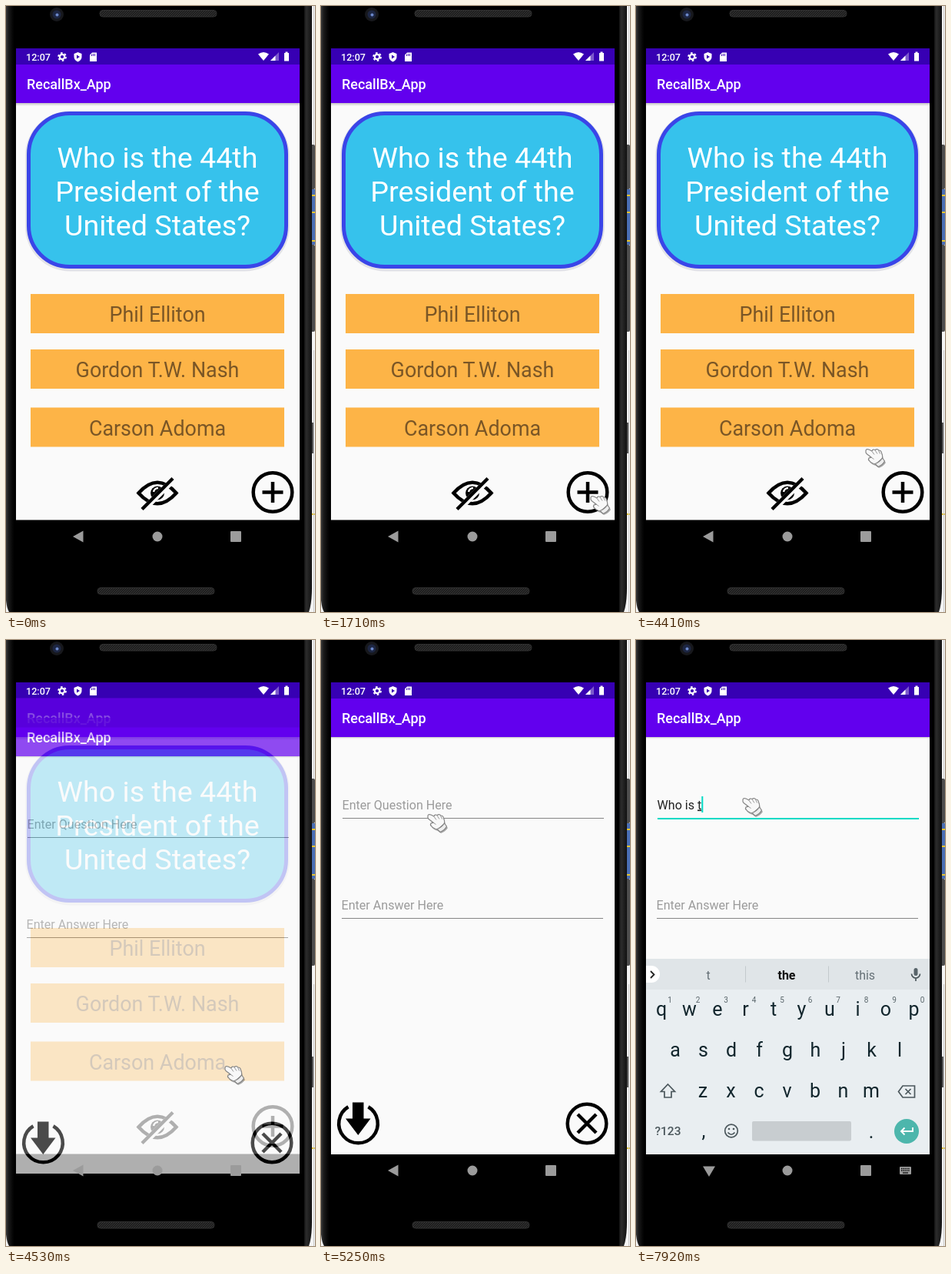
An HTML page that plays this animation: 402x787 px, repeating every 8000 ms.

```html
<!DOCTYPE html>
<html lang="en">
<head>
<meta charset="utf-8">
<title>Quiz card app</title>
<style>
  html, body { margin: 0; width: 100%; height: 100%; overflow: hidden; background: #f4f4f4; }
  svg { display: block; width: 100vw; height: 100vh; }
  text { font-family: Roboto, Inter, sans-serif; }
  .mid { text-anchor: middle; }
  .title { font-size: 18px; font-weight: 500; fill: #fff; }
  .ask { font-size: 37.7px; fill: #fff; }
  .option { font-size: 26.9px; fill: #7a5626; }
  .hint { font-size: 16.1px; fill: #9b9b9b; }
  .typed { font-size: 16.1px; fill: #212121; white-space: pre; }
  .typed .live { text-decoration: underline; }
  .key { font-size: 25px; fill: #12262d; }
  .digit { font-size: 10px; fill: #59656a; }
  .word { font-size: 16px; fill: #657076; }
  .line { fill: none; stroke: #000; stroke-width: 4.5; }
  .thin { fill: none; stroke: #4b575c; stroke-width: 1.7; }
</style>
</head>
<body>
<svg viewBox="0 0 402 787" preserveAspectRatio="none">
  <defs>
    <linearGradient id="side">
      <stop offset="0" stop-color="#3a3a3a"/><stop offset=".008" stop-color="#1c1c1c"/>
      <stop offset=".022" stop-color="#050505"/><stop offset=".97" stop-color="#050505"/>
      <stop offset=".982" stop-color="#2c2c2c"/><stop offset="1" stop-color="#111"/>
    </linearGradient>
    <linearGradient id="shade" x2="0" y2="1">
      <stop offset="0" stop-color="#000" stop-opacity=".22"/><stop offset="1" stop-color="#000" stop-opacity="0"/>
    </linearGradient>
    <pattern id="mesh" width="3" height="3" patternUnits="userSpaceOnUse">
      <rect width="3" height="3" fill="#1d1d1d"/><path d="M0 3L3 0" stroke="#3c3c3c" stroke-width=".8"/>
    </pattern>
    <clipPath id="screen"><rect x="13" y="55" width="369" height="613"/></clipPath>
  </defs>

  <!-- phone body -->
  <rect width="402" height="787" fill="#f4f4f4"/>
  <rect x="397" y="238" width="5" height="72" fill="#4a6fb5"/>
  <path d="M398 246h4M398 268h4M398 305h4M398 660h4" stroke="#e6c52f" stroke-width="2"/>
  <rect x="396" y="180" width="6" height="58" rx="2" fill="#4d4d4d"/>
  <rect x="396" y="310" width="6" height="113" rx="2" fill="#4d4d4d"/>
  <path d="M400.5 0V180M400.5 447V787" stroke="#c9c9c9"/>
  <path d="M399 541v40" stroke="#555" stroke-width="2"/>
  <path d="M0 0H398V755Q398 776 394 787H4Q1 782 0 772Z" fill="url(#side)"/>
  <rect x="10" width="378" height="787" fill="#000"/>
  <circle cx="66" cy="11" r="9" fill="#17181c"/>
  <circle cx="66" cy="11" r="5.5" fill="#1d2642"/>
  <circle cx="66.5" cy="11.5" r="2" fill="#6a86c8"/>
  <g fill="url(#mesh)" stroke="#303030">
    <rect x="122" y="5.500" width="152" height="8.500" rx="4"/>
    <rect x="119" y="755.500" width="152" height="8.500" rx="4"/>
  </g>

  <!-- quiz page -->
  <g id="quiz">
    <rect x="13" y="55" width="369" height="612.500" fill="#fafafa"/>
    <rect x="13" y="55" width="369" height="21" fill="#3700b3"/>
    <rect x="13" y="76" width="369" height="50" fill="#6200ee"/>
    <rect x="13" y="126" width="369" height="4" fill="url(#shade)"/>
    <text class="title" x="27" y="108">RecallBx_App</text>
    <rect x="25" y="136.500" width="344" height="208" rx="58" fill="#e3e3e6"/>
    <rect x="29.500" y="139.500" width="335" height="199" rx="53" fill="#36c2ec" stroke="#3a45e8" stroke-width="5"/>
    <g class="ask mid">
      <text x="197" y="210">Who is the 44th</text>
      <text x="197" y="254">President of the</text>
      <text x="197" y="298">United States?</text>
    </g>
    <g fill="#fdb447">
      <rect x="32" y="374" width="330" height="51"/>
      <rect x="32" y="446" width="330" height="51"/>
      <rect x="32" y="521.500" width="330" height="51"/>
    </g>
    <g class="option mid">
      <text x="197" y="409.500">Phil Elliton</text>
      <text x="197" y="482">Gordon T.W. Nash</text>
      <text x="197" y="557.500">Carson Adoma</text>
    </g>
    <path class="line" d="M172.500 632.500Q197 605 221.500 632.500Q197 660 172.500 632.500Z"/>
    <circle cx="197" cy="632.500" r="9"/>
    <path d="M192 631a6 6 0 0 1 6-5" fill="none" stroke="#fafafa" stroke-width="2.500"/>
    <path d="M178 655L219 614" stroke="#fafafa" stroke-width="8"/>
    <path class="line" d="M177 653.500L217 613.500"/>
    <circle class="line" cx="347" cy="631.500" r="25.300"/>
    <path class="line" d="M333.500 631.500h27M347 618v27"/>
  </g>

  <!-- form page -->
  <g id="form">
    <rect x="13" y="76" width="369" height="592" fill="#fafafa"/>
    <rect x="13" y="76" width="369" height="50" fill="#6200ee"/>
    <rect x="13" y="126" width="369" height="2" fill="url(#shade)"/>
    <text class="title" x="27" y="108">RecallBx_App</text>
    <text class="hint" id="ask" x="27.500" y="219.500">Enter Question Here</text>
    <text class="hint" x="26.500" y="349.500">Enter Answer Here</text>
    <rect id="rule" x="28" width="340"/>
    <rect x="27" y="361" width="340" height="1" fill="#858585"/>
    <text class="typed" x="27.500" y="219.500"><tspan id="done"></tspan><tspan id="live" class="live"></tspan></text>
    <rect id="caret" y="203" width="2" height="21" fill="#03dac5"/>
    <path class="line" d="M35.500 606.300A25.300 25.300 0 1 0 61.500 606.300"/>
    <path d="M41 600.500h14.500v21h9L48.300 643L32 621.500h9z"/>
    <circle class="line" cx="346" cy="628" r="25.300"/>
    <path class="line" d="M334 616l24 24M358 616l-24 24"/>
  </g>
  <rect id="strip" x="13" width="369"/>

  <!-- status bar -->
  <g fill="#fff">
    <text x="26" y="70.500" font-size="12.600" font-weight="500">12:07</text>
    <circle cx="73" cy="66" r="3.200" fill="none" stroke="#fff" stroke-width="2.200"/>
    <circle cx="73" cy="66" r="5" fill="none" stroke="#fff" stroke-width="1.800" stroke-dasharray="2.600 2.636"/>
    <path d="M93.500 60l5 2v4q0 4-5 6.500q-5-2.500-5-6.500v-4z"/>
    <path d="M92 63.500l4 2.500l-4 2.500z" fill="#3700b3"/>
    <path d="M112 60.500h6v11.500h-9v-8.500z"/>
    <path d="M111.500 62.500v2.500M113.500 62v3M115.500 62v3" stroke="#3700b3" stroke-width=".9"/>
    <path d="M328 62.500q7-5 14 0l-7 8.500z"/>
    <path d="M344 71L355 60v11z" opacity=".35"/><path d="M344 71l6.500-6.500v6.500z"/>
    <path d="M362 61h1.500v-1.500h3v1.500h1.500v10.500h-6z"/>
  </g>

  <!-- keyboard -->
  <g clip-path="url(#screen)"><g id="board">
    <rect x="13" y="414" width="369" height="254" fill="#e9eef1"/>
    <rect x="13" y="414" width="369" height="40" fill="#e0e5e8"/>
    <path d="M13 423h7a11 11 0 0 1 0 22h-7z" fill="#fff"/>
    <path d="M19 430l4.500 4.500l-4.500 4.500" fill="none" stroke="#222" stroke-width="1.800"/>
    <path d="M142.500 423.500v21M250.500 423.500v21" stroke="#c3c9cc"/>
    <g class="word mid" id="words"><text x="94" y="440.500"></text><text x="196" y="440.500"></text><text x="298" y="440.500"></text></g>
    <rect x="361.500" y="426" width="5" height="10" rx="2.500" fill="#58646a"/>
    <path class="thin" d="M358.500 433.500a5.500 5.500 0 0 0 11 0M364 439v4"/>
    <g class="mid" id="keys"></g>
    <path class="thin" d="M41.500 577l9 9.500h-4.500v7.500h-9v-7.500h-4.500z"/>
    <path class="thin" d="M347 579h15.500v15h-15.500l-5.500-7.500zM350.500 583l7 7M357.500 583l-7 7"/>
    <text class="mid" x="41.500" y="643" font-size="15.500" font-weight="500" fill="#4b575c">?123</text>
    <circle class="thin" cx="124" cy="637.500" r="8.300"/>
    <path class="thin" d="M119.500 639.500q4.500 5.500 9 0"/>
    <circle cx="121" cy="635" r="1.300" fill="#4b575c"/><circle cx="127" cy="635" r="1.300" fill="#4b575c"/>
    <rect x="151" y="625" width="129" height="25.500" rx="2" fill="#c8cdd0"/>
    <circle cx="352" cy="638" r="16" fill="#4db6ac"/>
    <path d="M360 633v5h-15M349.500 633.500l-4.500 4.500l4.500 4.500" fill="none" stroke="#fff" stroke-width="1.900"/>
  </g></g>

  <!-- navigation -->
  <g fill="#9b9b9b">
    <path id="back" d="M87 689l13.500-7.500v15z"/>
    <path id="down" d="M87 683.500h16l-8 13.500z"/>
    <circle cx="197" cy="689" r="6.500"/>
    <rect x="292" y="682" width="14" height="14" rx="1"/>
    <g id="switch">
      <rect x="343" y="684" width="15" height="10" rx="1"/>
      <path d="M345 686.500h11M345 689h11" stroke="#000" stroke-width="1.300" stroke-dasharray="1.300 1"/>
      <path d="M347 692h7" stroke="#000" stroke-width="1.200"/>
    </g>
  </g>

  <!-- pointer -->
  <g id="hand" stroke-linejoin="round">
    <path d="M3 6Q3 3 6 4L10 6Q12 3 15 5Q21 4 23 9L24 15L27 19Q24 24 18 26L14 23Q9 22 6 18Q5 15 9 14L4 9Z" fill="#000" opacity=".32"/>
    <path d="M1 4Q1 .500 5 2L9 4Q10 1 13 2.500Q16 .500 18 3Q21 3 21.500 6.500Q23 9 22.500 13.500L14 21Q8 20 6 17Q3.500 15.500 5 13Q7 12 8.500 12.500L2 7.500Q.500 6 1 4Z" fill="#f8f8f8" stroke="#858585" stroke-width="1.200"/>
    <path d="M22.500 13L25.500 17Q23 22 17 24.500L13 20.500Q19 18.500 22.500 13Z" fill="#eee" stroke="#858585" stroke-width="1.200"/>
    <path d="M9 4.500l3 4M13 3l3 4.500M17.500 3l2 4.500M8.500 12.500l3 2" fill="none" stroke="#999"/>
  </g>
</svg>
<script>
  const LOOP = 8000;
  const $ = id => document.getElementById(id);
  // 'inherit' keeps children hidden while their page is hidden
  const show = (id, on) => $(id).setAttribute('visibility', on ? 'inherit' : 'hidden');
  const put = (id, attrs) => { for (const k in attrs) $(id).setAttribute(k, attrs[k]); };

  // time, x, y
  const path = [
    [780, 145, 762], [930, 150, 746], [1050, 163, 721], [1170, 184, 691], [1290, 208, 666],
    [1440, 264, 654], [1560, 322, 640], [1710, 350, 635], [1860, 345, 629], [1980, 326, 611],
    [2130, 297, 505], [2250, 312, 565], [2370, 342, 635], [2520, 359, 647], [2670, 356, 642],
    [2820, 346, 627], [4410, 298, 574], [4530, 284, 552], [4680, 265, 526], [4830, 222, 412],
    [4980, 165, 295], [5130, 141, 240], [5250, 138, 225], [5370, 138, 204]
  ];
  // time, page offset, opacity, top of the blended strip
  const slide = [[4530, 25, .7, 75], [4680, 4, 1, 65], [4830, 1, 1, 57], [4980, 0, 1, 55]];
  // time, keyboard offset
  const rise = [[5670, 130], [5790, 36], [5910, 0]];
  // time, finished text, word in progress, suggestions
  const typing = [
    [0, '', '', 'the I thanks'],
    [6590, '', 'W', 'W We What'],
    [6990, '', 'Wh', 'Wh What When'],
    [7260, '', 'Who', 'Who Whole Whose'],
    [7380, 'Who ', '', 'is are wants'],
    [7530, 'Who ', 'i', 'i is in'],
    [7650, 'Who ', 'is', 'is isn’t it’s'],
    [7770, 'Who is ', '', 'the a going'],
    [7920, 'Who is ', 't', 't the this']
  ];
  const at = (list, t) => list.filter(step => step[0] <= t).pop();

  function buildKeys() {
    const label = (cls, x, y, s) => `<text class="${cls}" x="${x}" y="${y}">${s}</text>`;
    const row = (chars, x, y) => [...chars].map((c, i) => label('key', x + i * 36.5, y, c)).join('');
    $('keys').innerHTML = row('qwertyuiop', 33, 488) + row('asdfghjkl', 51, 541) + row('zxcvbnm', 87, 594)
      + label('key', 88, 646, ',') + label('key', 306, 647, '.')
      + [...'1234567890'].map((c, i) => label('digit', 44 + i * 36.5, 470.5, c)).join('');
  }

  let last;
  function type(step) {
    if (step === last) return;
    last = step;
    const [time, done, live, words] = step;
    $('done').textContent = done;
    $('live').textContent = live;
    words.split(' ').forEach((w, i) => { $('words').children[i].textContent = w; });
    const strong = live === 't';
    $('words').children[1].setAttribute('style', strong ? 'font-weight:700;fill:#111' : '');
    show('ask', !time);
    put('caret', { x: 27.5 + (time ? $('done').parentNode.getComputedTextLength() : 0) });
  }

  function draw(t) {
    const spot = at(path, t);
    show('hand', spot);
    if (spot) put('hand', { transform: `translate(${spot[1]} ${spot[2]})` });

    const page = at(slide, t);
    show('form', page);
    show('strip', page);
    show('quiz', !page || page[1]);
    if (page) {
      const [, dy, alpha, top] = page;
      put('form', { transform: `translate(0 ${dy})`, opacity: alpha });
      put('strip', { y: top, height: 76 + dy * 1.5 - top, opacity: alpha, fill: dy ? '#5400d4' : '#3700b3' });
    }

    const focus = t >= 5370;
    put('rule', focus ? { y: 231, height: 2, fill: '#03dac5' } : { y: 231, height: 1, fill: '#858585' });
    const kb = t >= 5520;
    show('back', !kb);
    show('down', kb);
    show('switch', kb);
    const lift = at(rise, t);
    show('board', lift);
    if (lift) put('board', { transform: `translate(0 ${lift[1]})` });

    type(at(typing, t));
    show('caret', (kb && t < 5910) || t >= 6440);
  }

  buildKeys();
  const start = performance.now();
  function tick() {
    draw((performance.now() - start) % LOOP);
    requestAnimationFrame(tick);
  }
  tick();
</script>
</body>
</html>
```
